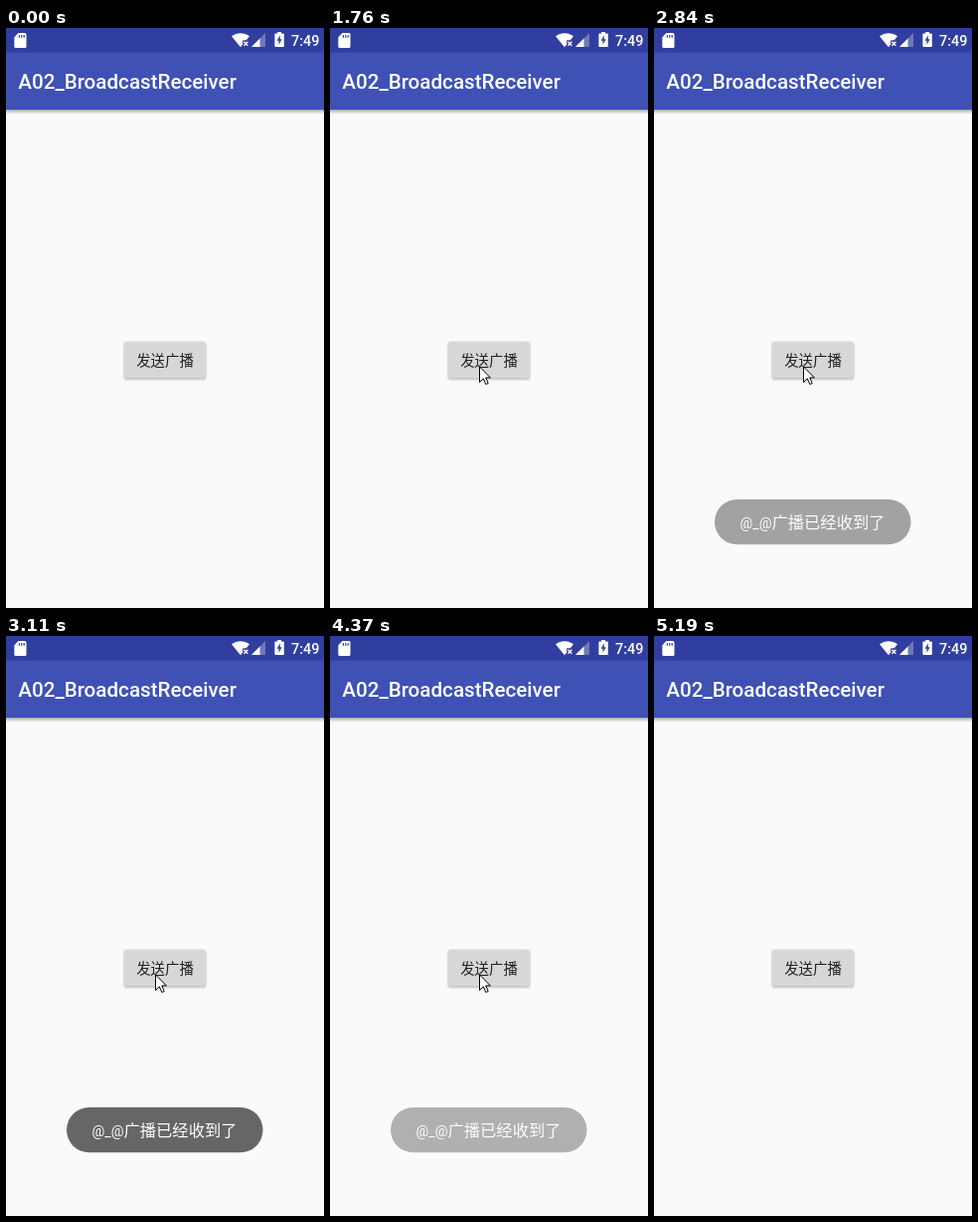
An HTML page for the animation above (5710 ms loop, 320 by 582 pixels).

```html
<!DOCTYPE html>
<html lang="zh-CN">
<head>
<meta charset="utf-8">
<style>
html, body { margin: 0; width: 100%; height: 100%; overflow: hidden; background: #fafafa; }
svg { display: block; }
text { font-family: Roboto, "Noto Sans CJK SC", "Noto Sans CJK", sans-serif; }
.cjk { font-family: "Noto Sans CJK SC", "Noto Sans CJK", sans-serif; }
.button { fill: #d6d7d7; filter: drop-shadow(0 1px 1px rgba(0, 0, 0, .32)); }
.pointer { fill: #fff; stroke: #000; stroke-width: 1; }
</style>
</head>
<body>
<svg width="320" height="582" viewBox="0 0 320 582">
  <defs>
    <linearGradient id="shade" x2="0" y2="1">
      <stop stop-opacity=".3"/>
      <stop offset="1" stop-opacity="0"/>
    </linearGradient>
  </defs>
  <rect width="320" height="582" fill="#fafafa"/>
  <rect y="82" width="320" height="4.5" fill="url(#shade)"/>
  <rect width="320" height="82" fill="#3f51b5"/>
  <rect width="320" height="24.6" fill="#303f9f"/>

  <!-- status icons -->
  <g fill="#fff">
    <path d="M12.5 5H19a1.5 1.5 0 0 1 1.5 1.5V18.5A1.5 1.5 0 0 1 19 20H9.8a1.5 1.5 0 0 1-1.5-1.5V9.2z"/>
    <path d="M236 19.3L227 8.2C232 4.2 240 4.2 245 8.2L241.8 12.2H238.2V16.6z"/>
    <path d="M247 19L261 5V19z" opacity=".3"/>
    <path d="M247 19L255.5 10.5V19z"/>
    <path d="M271 5.5H273.2V4H277V5.5H279.2L279.8 6.1V18.4L279.2 19H271L270.4 18.4V6.1z"/>
    <text x="287" y="18" font-size="14.4" font-weight="500">7:49</text>
    <text x="12.3" y="61" font-size="20.6" font-weight="500">A02_BroadcastReceiver</text>
  </g>
  <path d="M13.4 7V9.7M15.8 7V9.7M18.2 7V9.7" stroke="#303f9f" stroke-width="1.2"/>
  <path d="M239.4 13.8L243.4 17.8M243.4 13.8L239.4 17.8" stroke="#fff" stroke-width="1.3"/>
  <path d="M275.8 7.3L272.6 12.7H274.5V16.8L277.7 11.3H275.8z" fill="#303f9f"/>

  <rect class="button" x="119" y="314.8" width="82" height="36.7" rx="2"/>
  <text class="cjk" x="160" y="338.7" font-size="14.4" font-weight="500" text-anchor="middle" fill="#212121">发送广播</text>

  <g id="toast">
    <rect x="61" y="473" width="197.5" height="45.3" rx="22.6" fill="#666"/>
    <g fill="#fff">
      <text x="118.5" y="502" font-size="14.2" text-anchor="end">@_@</text>
      <text class="cjk" x="118.5" y="502.3" font-size="16.3">广播已经收到了</text>
    </g>
  </g>

  <path id="resize" class="pointer" d="M12.5 461.5L8.5 457.5V460.5H-5V462.5H8.5V465.5z"/>
  <path id="arrow" class="pointer" d="M.5 .9V16.5L4.3 12.9L6.8 18.5L9.2 17.5L6.8 11.9H11.4z"/>
</svg>
<script>
const LOOP = 5710;
const [toast, resize, arrow] = ["toast", "resize", "arrow"].map(id => document.getElementById(id));

// Screen refresh times: the picture holds between them
const ticks = [0, 400, 1350, 1480, 1760, 2720, 2840, 2990, 3110, 4250, 4370, 4490, 4640, 4760, 4910, 5060, 5190];

// [time, x, y] of the arrow's tip
const path = [
  [1350, 100, 385], [1480, 149, 340], [1760, 150, 339], [4640, 198, 396],
  [4760, 247, 463], [4910, 264, 550], [5060, 268, 571]
];

const clamp = v => Math.min(1, Math.max(0, v));
const show = (el, on) => el.setAttribute("visibility", on ? "visible" : "hidden");

function toastAlpha(t) {
  const enter = clamp((t - 2670) / 475);
  const leave = clamp((t - 4032) / 475);
  return 1 - (1 - enter) ** 2 - leave ** 2;
}

function draw(now) {
  const time = now % LOOP;
  const t = ticks.findLast(tick => tick <= time);
  toast.setAttribute("opacity", clamp(toastAlpha(t)));
  show(resize, t === 400);
  show(arrow, t >= 1350 && t < 5190);
  const [, x, y] = path.findLast(p => p[0] <= t) || path[0];
  arrow.setAttribute("transform", `translate(${x} ${y})`);
}

const start = performance.now();
function frame() {
  draw(performance.now() - start);
  requestAnimationFrame(frame);
}
frame();
</script>
</body>
</html>
```
